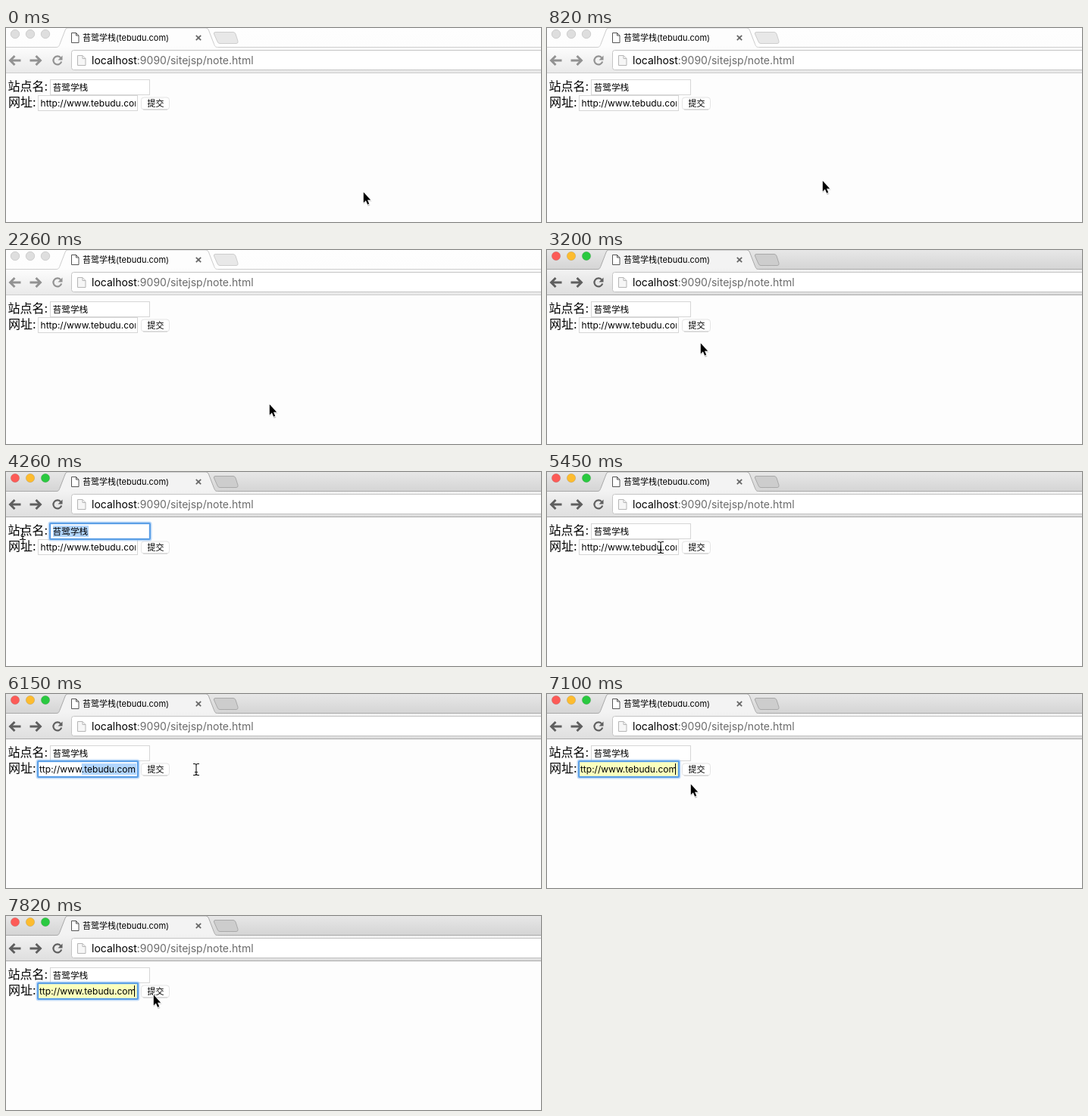
These frames come from a looping animation (706x257 px, 8 s). An HTML page:

```html
<!DOCTYPE html>
<html lang="zh-CN">
<head>
<meta charset="utf-8">
<title>Form</title>
<style>
  html, body { margin: 0; width: 100%; height: 100%; overflow: hidden; background: #fdfdfd; }
  svg { display: block; }
  text { font-family: Inter, "Noto Sans CJK SC", sans-serif; font-size: 12px; fill: #000; white-space: pre; }
  #stage {
    --strip1: #fefefe; --strip2: #fdfdfd; --bar1: #fdfdfd; --bar2: #e9e9e9;
    --line: #cdcdcd; --icon: #929292; --add: #e8e8e8;
    --red: #dedede; --amber: #dedede; --green: #dedede; --rim: #c6c6c6;
  }
  #stage.on {
    --strip1: #e7e7e7; --strip2: #d4d4d4; --bar1: #f3f3f3; --bar2: #dedede;
    --line: #a9a9a9; --icon: #5f5f5f; --add: #cdcdcd;
    --red: #fc5b57; --amber: #fdbc2f; --green: #2ac940; --rim: #0002;
  }
  .rim { stroke: var(--rim); stroke-width: .8; }
  .line { stroke: var(--line); fill: none; }
  .icon { stroke: var(--icon); stroke-width: 2.9; fill: none; }
  .field { fill: #fff; stroke: #d6d6d6; }
  .fill { fill: #faffbd; }
  .sel { fill: #b2d6fe; }
  .ring { fill: none; stroke: #5b9fe6; stroke-width: 2; }
  .glow { fill: none; stroke: #8fc0f4; stroke-opacity: .55; stroke-width: 4; }
  .menu { stroke: #93b9e4; }
  .label { font-size: 16px; }
  .bold { font-size: 13px; font-weight: 700; }
  .caret { stroke: #000; }
</style>
</head>
<body>
<svg id="stage" width="706" height="257" viewBox="0 0 706 257">
  <defs>
    <linearGradient id="strip" x2="0" y2="1">
      <stop style="stop-color:var(--strip1)"/><stop offset="1" style="stop-color:var(--strip2)"/>
    </linearGradient>
    <linearGradient id="bar" gradientUnits="userSpaceOnUse" x2="0" y2="60">
      <stop style="stop-color:var(--bar1)"/><stop offset=".4" style="stop-color:var(--bar1)"/>
      <stop offset="1" style="stop-color:var(--bar2)"/>
    </linearGradient>
  </defs>
  <rect width="706" height="257" fill="#fdfdfd"/>

  <!-- browser chrome -->
  <rect width="706" height="26" fill="url(#strip)"/>
  <rect y="26" width="706" height="34" fill="url(#bar)"/>
  <path d="M66 26.500C69.500 26 70 24 71.500 20L78 3Q79 0 81 0H264Q266.500 0 267.500 3L274 20C275.500 24 276 26 279.500 26.500Z" fill="url(#bar)"/>
  <path class="line" d="M0 25.500H66C69.500 25.500 70 24 71.500 20L78 3Q79 0 81 0H264Q266.500 0 267.500 3L274 20C275.500 24 276 25.500 279.500 25.500H706M0 59.500H706"/>
  <path class="line" d="M276 5.500H300Q302 5.500 303 8L306 17.500Q306.500 20.500 304 20.500H282Q280 20.500 279 18L274.500 8Q274 5.500 276 5.500Z" style="fill:var(--add)"/>
  <circle class="rim" cx="12" cy="8" r="5.700" style="fill:var(--red)"/>
  <circle class="rim" cx="32" cy="8" r="5.700" style="fill:var(--amber)"/>
  <circle class="rim" cx="52" cy="8" r="5.700" style="fill:var(--green)"/>
  <path d="M86.500 6.500H92.500L96 10V19.500H86.500ZM92.500 6.500V10H96" fill="#fff" stroke="#555"/>
  <text x="101" y="17" style="font-size:11px">苔鹭学栈(tebudu.com)</text>
  <path d="M250.800 9.800l6.400 6.400m0-6.400l-6.400 6.400" stroke="#666" stroke-width="1.700"/>
  <path class="icon" d="M19.500 43H6M11.500 37L5.500 43L11.500 49M31.500 43H45M39.500 37L45.500 43L39.500 49"/>
  <path class="icon" d="M72 39.200A5.500 5.500 0 1 0 73.200 44.500" style="stroke-width:2.200"/>
  <path d="M74.500 36.500V42.500H68.500Z" style="fill:var(--icon)"/>
  <path d="M710 29.500H89.500Q86.500 29.500 86.500 32.500V52.500Q86.500 55.500 89.500 55.500H710" fill="#fff" stroke="#c4c4c4"/>
  <path d="M94.500 36.500H101L105 40.500V49.500H94.500ZM101 36.500V40.500H105" fill="#f6f6f6" stroke="#b5b5b5"/>
  <text x="113" y="48" style="font-size:14px">localhost<tspan fill="#6b6b6b">:9090/sitejsp/note.html</tspan></text>

  <!-- form -->
  <text class="label" x="2.500" y="83">站点名:</text>
  <text class="label" x="3" y="104">网址:</text>
  <rect class="field" x="58.500" y="68.500" width="131" height="20"/>
  <rect class="field" x="42.500" y="89.500" width="131" height="20"/>
  <rect x="178.500" y="92" width="37" height="16" rx="3.500" fill="#fff" stroke="#e3e3e3"/>
  <path d="M181 108H213" stroke="#c8c8c8"/>
  <text x="186.500" y="104" style="font-size:11px">提交</text>

  <rect id="fill1" class="fill" x="59" y="69" width="131" height="20"/>
  <rect id="fill2" class="fill" x="43" y="90" width="131" height="20"/>
  <rect id="sel1" class="sel" y="71" height="15"/>
  <rect id="sel2" class="sel" y="92" height="15"/>
  <text x="61.500" y="83" style="font-size:11.700px">苔鹭学栈</text>
  <svg x="44" y="89" width="127" height="21"><text id="site" y="15">http://www.tebudu.com</text></svg>
  <g id="ring1">
    <rect class="glow" x="57.500" y="67.500" width="133" height="22" rx="1.500"/>
    <rect class="ring" x="58" y="68" width="132" height="21" rx="1"/>
  </g>
  <g id="ring2">
    <rect class="glow" x="41.500" y="88.500" width="133" height="22" rx="1.500"/>
    <rect class="ring" x="42" y="89" width="132" height="21" rx="1"/>
  </g>
  <path id="caret1" class="caret" d="M109.500 71V86"/>
  <path id="caret2" class="caret" d="M169.500 92V107"/>
  <g id="menu1">
    <rect id="item1" class="menu" x="58.500" y="90.500" width="132" height="24"/>
    <text class="bold" x="67" y="107.500">苔鹭学栈</text>
  </g>
  <g id="menu2">
    <rect id="item2" class="menu" x="42.500" y="111.500" width="173" height="24"/>
    <text class="bold" x="51" y="128">http://www.tebudu.com</text>
  </g>

  <!-- pointers -->
  <g id="arrow">
    <path d="M-.5 2V16.500L3 13.500L5.500 19L8.500 18L6.300 12.500H10.800Z" fill="#0003"/>
    <path d="M-.2 .6V14.400L2.900 11.600L5.100 16.700L7.200 15.800L5 10.800H9.200Z" stroke="#fff" stroke-width="1.400" paint-order="stroke"/>
  </g>
  <path id="beam" d="M-4 -7.500H-2Q0 -7.500 0 -5.500Q0 -7.500 2 -7.500H4M0 -5.500V5.500M-2 3.500H2M-4 7.500H-2Q0 7.500 0 5.500Q0 7.500 2 7.500H4" fill="none" stroke="#111" stroke-width="1.100"/>
</svg>
<script>
const $ = id => document.getElementById(id);
const show = (id, on) => $(id).style.display = on ? '' : 'none';
const clamp = (v, lo, hi) => Math.max(lo, Math.min(hi, v));

// pointer path: time, x, y
const path = [
  [0, 472, 217], [470, 415, 201], [820, 364, 202], [940, 347, 203],
  [2141, 347, 203], [2258, 348, 204], [2728, 348, 204], [3197, 203, 123], [3550, 121, 83],
  [3667, 114, 79], [4019, 22, 82], [4371, 22, 82], [4606, 130, 82], [4723, 150, 97],
  [4841, 194, 98], [5076, 262, 107], [5193, 262, 104],
  [5428, 150, 100], [5545, 108, 100], [6132, 251, 100], [6250, 276, 103],
  [6484, 160, 101], [6601, 140, 103], [6719, 142, 117], [6954, 158, 120],
  [7071, 190, 119], [7189, 207, 113], [7541, 195, 104]
];

function pointer(t) {
  const i = path.findIndex(p => p[0] > t);
  if (i < 0) return path[path.length - 1].slice(1);
  const [a, b] = [path[i - 1], path[i]], k = (t - a[0]) / (b[0] - a[0]);
  return [1, 2].map(n => Math.round(a[n] + (b[n] - a[n]) * k));
}

function select(id, from, to) {
  $(id).setAttribute('x', from);
  $(id).setAttribute('width', Math.max(0, to - from));
}

function stepTime(t) {
  const [base, step] = t < 2000 ? [0, 117] : [2845, 117.4];
  return base + Math.floor((t - base) / step) * step;
}

function draw(t) {
  const q = stepTime(t), within = (a, b) => q >= a && q < b;
  const [x, y] = pointer(q);
  $('stage').classList.toggle('on', t >= 2620);

  const beam = within(3660, 4720) || within(5420, 6360) || within(6470, 6710);
  show('beam', beam);
  show('arrow', !beam);
  $(beam ? 'beam' : 'arrow').setAttribute('transform', `translate(${x} ${y})`);

  show('ring1', within(3660, 5070));
  show('sel1', within(3780, 4600));
  select('sel1', clamp(x, 62, 109), 109);
  show('caret1', within(4600, 5070));
  show('menu1', within(4600, 5070));
  show('fill1', within(4720, 5070));
  $('item1').style.fill = q >= 4720 ? '#b0d5ff' : '#fff';

  // dragging past the right edge scrolls the address to its end
  const site = $('site'), left = q >= 5800 ? 127 - site.getComputedTextLength() : 1.6;
  site.setAttribute('x', left);
  const from = 44 + left + site.getSubStringLength(0, 10);
  show('ring2', q >= 5540);
  show('sel2', within(5540, 6600));
  select('sel2', from, q >= 5800 ? 172 : clamp(x, from, 172));
  show('caret2', q >= 6600 && !(t >= 7335 && t < 7820));
  show('menu2', within(6600, 6950));
  show('fill2', q >= 6710);
  $('item2').style.fill = q >= 6710 ? '#b0d5ff' : '#fff';
}

function loop() {
  draw(performance.now() % 8000);
  requestAnimationFrame(loop);
}
loop();
</script>
</body>
</html>
```
